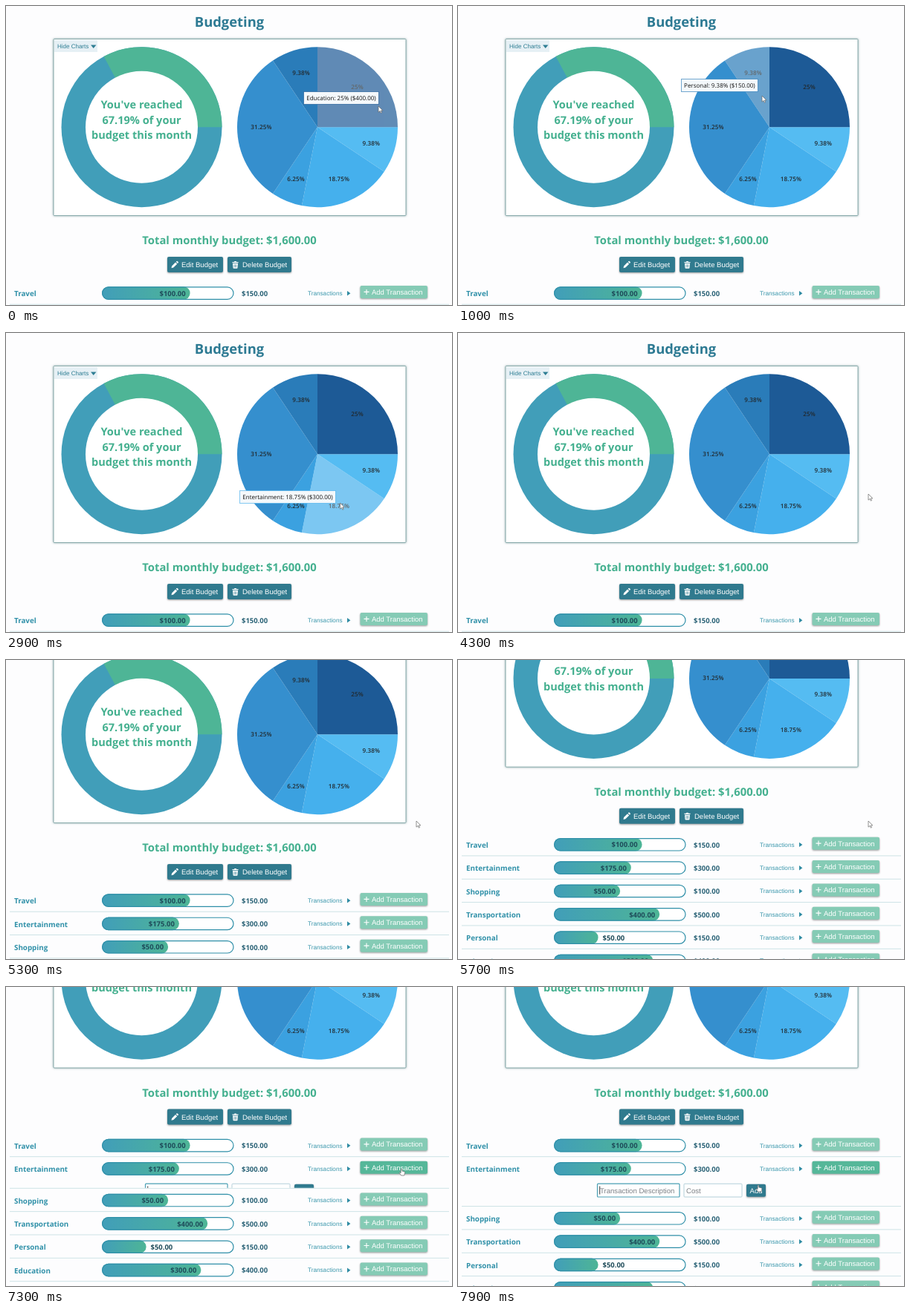
Write an HTML page that moves like this. It is 600 px wide and 403 px high and loops after 8 s.

```html
<!DOCTYPE html>
<html lang="en">
<head>
<meta charset="utf-8">
<title>Budgeting</title>
<style>
  html, body { margin: 0; width: 100%; height: 100%; overflow: hidden; background: #fdfdfe; }
  svg { display: block; width: 600px; height: 403px; text-rendering: geometricPrecision; }
  .head { font-family: "Open Sans", "Noto Sans", sans-serif; font-weight: 700; }
  .ui { font-family: "Liberation Sans", Arial, sans-serif; }
  .chart { font-family: "Open Sans", "Noto Sans", sans-serif; font-weight: 600; }
  .tip { font-family: "Open Sans", "Noto Sans", sans-serif; font-weight: 500; }
  .raised { filter: drop-shadow(0 1px 1.2px rgba(0, 0, 0, .4)); }
  .panel { filter: drop-shadow(0 0 1.5px rgba(40, 90, 90, .5)); }
</style>
</head>
<body>
<svg id="stage" viewBox="0 0 600 403">
  <defs>
    <linearGradient id="fill"><stop stop-color="#419eb9"/><stop offset="1" stop-color="#4eb596"/></linearGradient>
    <clipPath id="formClip"><rect id="formBox" x="180" y="433" width="250" height="0"/></clipPath>
  </defs>
</svg>
<script>
const LOOP = 8000, STEP = 100;
const DEEP = '#307a8e', TEAL = '#419eb9', GREEN = '#4eb596', PALE = '#85cbb5', DARK = '#1f4c5a';
const ROW_H = 31.35, FORM_H = 35.5, TOTAL = 1600;
const PIE = { x: 419, y: 163.2, r: 108 };
const RING = { x: 182.5, y: 163.2, r: 108, hole: 75.5 };

const budgets = [
  { name: 'Travel', spent: 100, limit: 150, color: '#55bcf2' },
  { name: 'Entertainment', spent: 175, limit: 300, color: '#45b0ed' },
  { name: 'Shopping', spent: 50, limit: 100, color: '#3ba1e0' },
  { name: 'Transportation', spent: 400, limit: 500, color: '#358fce' },
  { name: 'Personal', spent: 50, limit: 150, color: '#2a7cb9' },
  { name: 'Education', spent: 300, limit: 400, color: '#1d5a96' }
];

// Keys are [time, ...values]
const cursorKeys = [
  [0, 501, 135], [100, 499, 134], [850, 411, 122], [1000, 409, 121], [1200, 405, 122],
  [1600, 364, 142], [2050, 362, 185], [2400, 388, 226], [2800, 449, 229], [3000, 450, 229],
  [3450, 490, 190], [3700, 492, 188], [4150, 552, 217], [5900, 552, 217], [6300, 555, 218],
  [6600, 555, 218], [7000, 532, 245], [7450, 532, 245], [7800, 404, 267]
];
const tipKeys = [[0, 1, -3], [900, -5, -6], [1200, -5, -6], [2800, -6, 0]];
const scrollKeys = [[4750, 0], [5050, 63], [5350, 63], [5600, 126], [5900, 173.5]];
const openKeys = [[7150, 0], [7550, 1]];

const NS = 'http://www.w3.org/2000/svg';
const stage = document.getElementById('stage');

function el(parent, tag, attrs = {}) {
  const node = document.createElementNS(NS, tag);
  set(node, attrs);
  parent.appendChild(node);
  return node;
}
function set(node, attrs) {
  for (const k in attrs) node.setAttribute(k, attrs[k]);
}
function text(parent, str, x, y, size, fill, cls, anchor = 'start') {
  const node = el(parent, 'text', { x, y, fill, class: cls, 'font-size': size, 'text-anchor': anchor });
  node.textContent = str;
  return node;
}
function box(parent, x, y, width, height, rx, fill, more = {}) {
  return el(parent, 'rect', { x, y, width, height, rx, fill, ...more });
}
function path(parent, d, fill, more = {}) {
  return el(parent, 'path', { d, fill, ...more });
}
const group = (parent, attrs) => el(parent, 'g', attrs);
const move = (node, x, y) => node.setAttribute('transform', `translate(${x} ${y})`);
const show = (node, on) => node.setAttribute('visibility', on ? 'visible' : 'hidden');
const money = n => '$' + n.toFixed(2);
const percent = n => +(n / TOTAL * 100).toFixed(2) + '%';

function at(keys, t) {
  let i = keys.findIndex(k => k[0] > t);
  if (i < 0) i = keys.length;
  const a = keys[Math.max(i - 1, 0)], b = keys[Math.min(i, keys.length - 1)];
  const p = b[0] > a[0] ? (t - a[0]) / (b[0] - a[0]) : 0;
  const e = p * p * (3 - 2 * p);
  return a.slice(1).map((v, n) => v + (b[n + 1] - v) * e);
}

// Angles are in turns, clockwise from the right
function polar(c, r, turn) {
  const a = turn * 2 * Math.PI;
  return [c.x + r * Math.cos(a), c.y + r * Math.sin(a)];
}
function wedge(c, from, to) {
  return `M${c.x} ${c.y}L${polar(c, c.r, from)}A${c.r} ${c.r} 0 ${to - from > .5 ? 1 : 0} 1 ${polar(c, c.r, to)}Z`;
}

const page = group(stage);
text(page, 'Budgeting', 300.5, 28.4, 18.4, '#2d7a93', 'head', 'middle');
box(page, 64, 44.5, 474, 238, 1, '#fff', { stroke: '#86a9aa', 'stroke-width': 1, class: 'panel' });

function drawRing() {
  el(page, 'circle', { cx: RING.x, cy: RING.y, r: RING.r, fill: TEAL });
  path(page, wedge(RING, .6719, 1), GREEN);
  el(page, 'circle', { cx: RING.x, cy: RING.y, r: RING.hole, fill: '#fff' });
  ["You've reached", '67.19% of your', 'budget this month'].forEach((line, i) =>
    text(page, line, RING.x, 138.4 + i * 20.4, 14.55, '#44b08f', 'head', 'middle'));
  box(page, 65, 46, 58, 16, 0, '#e6f0f5');
  text(page, 'Hide Charts', 69, 57, 8, '#2d7d93', 'ui');
  path(page, 'M114 52.5h7.4l-3.7 4.6z', '#2d7d93');
}

function drawPie() {
  let turn = 0;
  for (const b of budgets) {
    b.from = turn;
    b.to = turn += b.limit / TOTAL;
    b.slice = group(page);
    path(b.slice, wedge(PIE, b.from, b.to), b.color);
    const [x, y] = polar(PIE, PIE.r * .7, (b.from + b.to) / 2);
    text(b.slice, percent(b.limit), x, y + 2.6, 8.1, '#22292e', 'chart', 'middle')
      .setAttribute('letter-spacing', .1);
  }
}

function drawActions() {
  text(page, 'Total monthly budget: $1,600.00', 300.5, 321.2, 14.8, '#44b08f', 'head', 'middle');
  box(page, 217, 338, 75, 21, 2, DEEP, { class: 'raised' });
  path(page, 'M222.5 353.2l.6-2.8 4.9-4.9 2.2 2.2-4.9 4.9zM228.7 344.8l.9-.9q.5-.4 1 0l1.2 1.2q.4.5 0 1l-.9.9z', '#fff');
  text(page, 'Edit Budget', 236, 352.3, 9.5, '#fff', 'ui');
  box(page, 298, 338, 86, 21, 2, DEEP, { class: 'raised' });
  path(page, 'M304.5 345h2.3l.7-1h2l.7 1h2.3v1.2h-8zM305 347h7l-.5 6q-.1.8-.9.8h-4.2q-.8 0-.9-.8z', '#fff');
  path(page, 'M307 348.3v4M308.5 348.3v4M310 348.3v4', 'none', { stroke: DEEP, 'stroke-width': .6 });
  text(page, 'Delete Budget', 318, 352.3, 9.5, '#fff', 'ui');
}

function drawRow(b) {
  const g = b.row = group(page);
  const w = 177 * b.spent / b.limit + .6, end = 129 + w, inside = w > 70;
  text(g, b.name, 11, 391.2, 9.8, '#3191a9', 'head');
  box(g, 129.5, 378.8, 176.5, 16.6, 8.3, '#fff');
  box(g, 129, 378.2, w, 17.6, 8.8, 'url(#fill)');
  box(g, 129.6, 378.9, 176.4, 16.4, 8.2, 'none', { stroke: '#2f8fa8', 'stroke-width': 1.2 });
  text(g, money(b.spent), inside ? end - 6 : end + 6, 390.8, 9.45, DARK, 'head', inside ? 'end' : 'start');
  text(g, money(b.limit), 317, 390.9, 9.45, '#2b6377', 'head');
  text(g, 'Transactions', 406, 390, 8.2, '#3b97ac', 'ui');
  path(g, 'M459 384v6.4l4.4-3.2z', '#2f8ba3');
  b.button = box(g, 476.5, 377, 90.5, 17, 2, PALE, { class: 'raised' });
  path(g, 'M485 381.9v7M481.5 385.4h7', 'none', { stroke: '#fff', 'stroke-width': 1.1 });
  text(g, 'Add Transaction', 492, 388.9, 9.5, '#fff', 'ui');
  b.line = box(page, 5, 401.7, 591, 1, 0, '#cde3e6');
}

function drawForm() {
  const g = group(page, { 'clip-path': 'url(#formClip)' });
  box(g, 187.5, 438.7, 110.5, 17.8, 1, '#fff', { stroke: '#4a9fb4', 'stroke-width': 1.2 });
  text(g, 'Transaction Description', 191, 451, 9.6, '#7c8086', 'ui');
  box(g, 190.3, 442, .9, 11, 0, '#222');
  box(g, 304, 438.7, 78, 17.8, 1, '#fff', { stroke: '#b4d0d9', 'stroke-width': 1 });
  text(g, 'Cost', 307, 451, 9.6, '#7c8086', 'ui');
  box(g, 388, 439.2, 26, 17, 2, DEEP, { class: 'raised' });
  text(g, 'Add', 401, 451, 9.5, '#fff', 'ui', 'middle');
  return g;
}

drawRing();
drawPie();
drawActions();
budgets.forEach(drawRow);
const form = drawForm();
const formBox = document.getElementById('formBox');

const tip = group(stage);
const tipBox = box(tip, 0, -16.5, 0, 17, 0, '#f4f8fb', { 'stroke-width': 1, 'stroke-opacity': .65 });
const tipText = text(tip, '', -3.8, -5.2, 8, '#111', 'tip', 'end');

const outline = { stroke: '#666', 'stroke-width': .7, 'stroke-linejoin': 'round' };
const arrow = path(stage, 'M0 0V8.2L2 6.4 3.3 9.2 4.6 8.6 3.3 5.9H5.9Z', '#fff', outline);
const hand = path(stage, 'M-.8 4.6V.6Q0-.6.8.6V3L4 3.8Q4.9 4.2 4.6 5.5L3.8 9H-.4L-2.9 5.6Q-2.6 4.2-.8 5.6Z', '#fff', outline);

function sliceAt(x, y) {
  const dx = x - PIE.x, dy = y - PIE.y;
  if (Math.hypot(dx, dy) > PIE.r) return null;
  const turn = (Math.atan2(dy, dx) / (2 * Math.PI) + 1) % 1;
  return budgets.find(b => turn >= b.from && turn < b.to);
}

function render(t) {
  const [x, y] = at(cursorKeys, t);
  const [scroll] = at(scrollKeys, t);
  const [open] = at(openKeys, t);
  move(page, 0, -scroll);

  const hot = scroll ? null : sliceAt(x, y);
  let pointing = open > 0 && x > 388 && x < 414;
  budgets.forEach((b, i) => {
    const top = i * ROW_H, shift = open * FORM_H;
    const rowY = top + (i > 1 ? shift : 0);
    move(b.row, 0, rowY);
    move(b.line, 0, top + (i > 0 ? shift : 0));
    const by = 377 + rowY - scroll;
    const over = x > 476 && x < 567 && y > by && y < by + 17.5;
    pointing = pointing || over;
    set(b.button, { fill: over || (i === 1 && open > 0) ? '#55b799' : PALE });
    set(b.slice, { opacity: b === hot ? .7 : 1 });
  });

  set(formBox, { height: open * FORM_H });
  show(form, open > 0);

  show(tip, hot);
  if (hot) {
    const [ox, oy] = at(tipKeys, t);
    move(tip, Math.round(x + ox) - .5, Math.round(y + oy));
    tipText.textContent = `${hot.name}: ${percent(hot.limit)} (${money(hot.limit)})`;
    const w = Math.round(tipText.getComputedTextLength() + 7.6);
    set(tipBox, { x: -w, width: w, stroke: hot.color });
  }

  move(arrow, x, y);
  move(hand, x, y);
  show(arrow, !pointing);
  show(hand, pointing);
}

function tick() {
  const t = performance.now() % LOOP;
  render(Math.floor(t / STEP) * STEP);
  requestAnimationFrame(tick);
}
tick();
</script>
</body>
</html>
```
